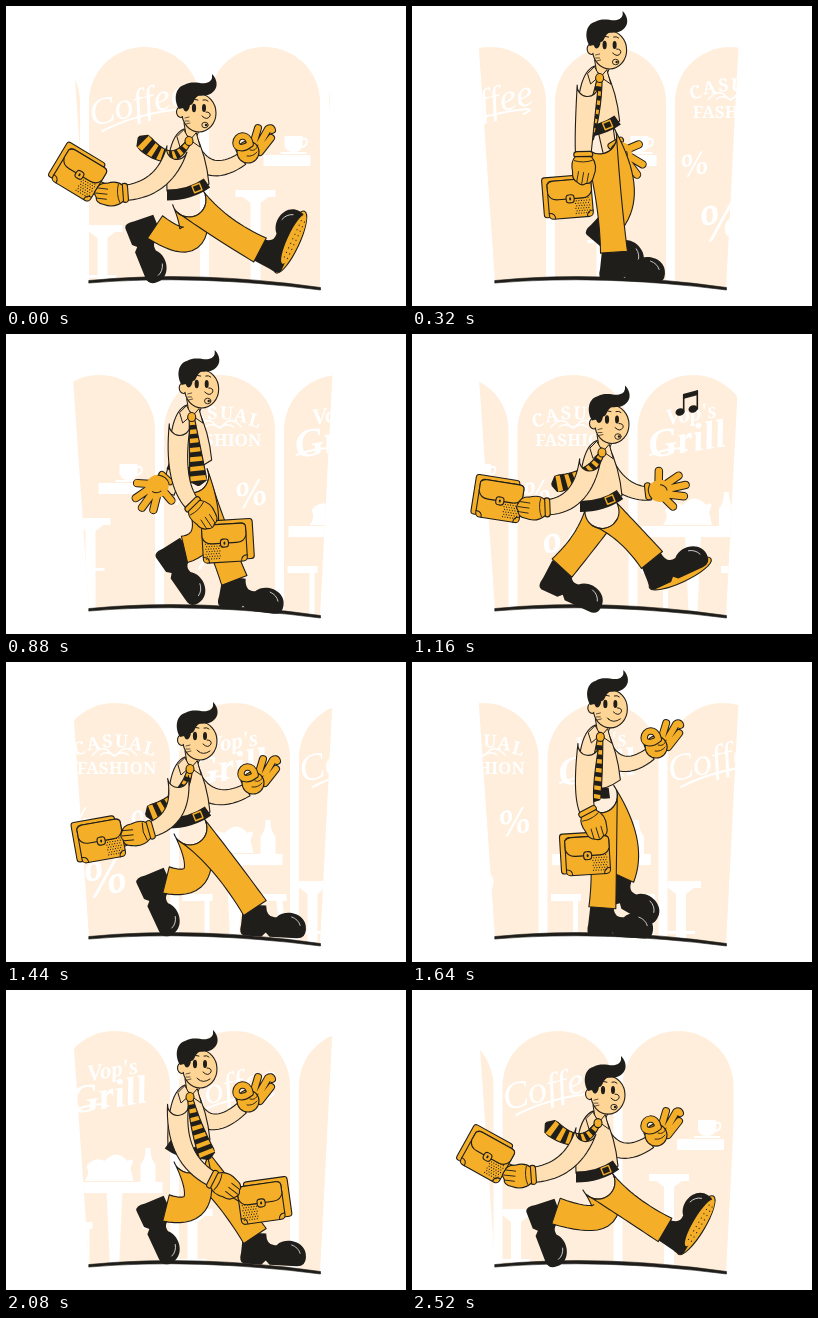
An HTML page with a canvas that plays this animation: 400 by 300 pixels, repeating every 2.56 s.

```html
<!DOCTYPE html>
<html lang="en">
<head>
<meta charset="utf-8">
<title>Stroll past the shops</title>
<style>
html, body { margin: 0; width: 100%; height: 100%; overflow: hidden; background: #fff; }
canvas { display: block; width: 400px; height: 300px; }
</style>
</head>
<body>
<canvas id="stage" width="400" height="300"></canvas>
<script>
const g = document.getElementById('stage').getContext('2d');
const INK = '#1f1e1a', ORANGE = '#f5ae28', SKIN = '#ffd596', SHIRT = '#ffe0b5', PEACH = '#ffeedb';
const LOOP = 2560, WALK = 1280, STEP = 40, TAU = Math.PI * 2;

// Periodic smooth interpolation; rows are [time, ...values].
function tween(rows, period, time) {
  const n = rows.length, t = ((time % period) + period) % period;
  let i = n - 1;
  while (i > 0 && rows[i][0] > t) i--;
  const at = k => {
    const m = ((k % n) + n) % n;
    return { r: rows[m], t: rows[m][0] + Math.floor(k / n) * period };
  };
  const [a, b, c, d] = [at(i - 1), at(i), at(i + 1), at(i + 2)];
  const h = c.t - b.t, s = (t - b.t) / h, s2 = s * s, s3 = s2 * s;
  return b.r.slice(1).map((v, j) => {
    const k = j + 1;
    const m0 = (c.r[k] - a.r[k]) / (c.t - a.t) * h;
    const m1 = (d.r[k] - v) / (d.t - b.t) * h;
    return (2 * s3 - 3 * s2 + 1) * v + (s3 - 2 * s2 + s) * m0 + (3 * s2 - 2 * s3) * c.r[k] + (s3 - s2) * m1;
  });
}

const SWAY = [[0, 0], [160, 1], [340, 5], [520, 7], [600, 3]];

// ankle x, ankle y, knee x, knee y, shoe angle
const LEG = [
  [0, 254, 244, 212, 222, -65], [160, 249, 246, 215, 195, 3], [340, 196, 246, 196, 195, 3],
  [440, 169, 243, 186, 200, 10], [520, 150, 234, 176, 206, 25], [600, 144, 221, 213, 244, 69],
  [640, 149, 221, 201, 256, 68], [800, 160, 218, 208, 230, 65], [980, 205, 214, 225, 182, 35],
  [1160, 240, 226, 215, 195, -25], [1240, 253, 240, 212, 216, -59]
];

// hand x, hand y, elbow x, elbow y, case x, case y, case angle
const CASE_ARM = [
  [0, 104, 188, 158, 184, 74, 168, 31], [160, 130, 172, 178, 158, 95, 178, -10],
  [380, 188, 163, 168, 138, 184, 192, -4], [600, 248, 177, 165, 197, 277, 155, -32],
  [800, 220, 196, 168, 170, 255, 212, -8], [980, 165, 160, 165, 132, 163, 191, 0],
  [1160, 120, 174, 170, 172, 88, 166, 9], [1240, 106, 186, 160, 182, 76, 166, 29]
];

// hand offset from the head
const FREE_ARM = [
  [0, 78, 69], [160, 76, 88], [380, 18, 155], [600, -64, 110], [800, -45, 122], [980, 12, 152],
  [1160, 74, 103], [1440, 82, 72], [1880, 66, 68], [2080, 77, 62], [2520, 77, 70]
];

// control x, y, tip x, y, offsets from the head
const TIE = [
  [0, -5, 98, -37, 62], [160, 7, 100, -31, 112], [380, 10, 100, 8, 130], [600, 14, 103, 50, 86],
  [800, 18, 96, 32, 128], [980, 12, 100, 2, 132], [1160, 1, 93, -37, 98], [1240, -4, 98, -39, 66]
];

function paint(fill, line = 1.1) {
  if (fill) { g.fillStyle = fill; g.fill(); }
  if (line) { g.strokeStyle = INK; g.lineWidth = line; g.stroke(); }
}
function shape(d, fill, line) {
  const p = new Path2D(d);
  if (fill) { g.fillStyle = fill; g.fill(p); }
  if (line) { g.strokeStyle = INK; g.lineWidth = line; g.stroke(p); }
}
function oval(x, y, rx, ry, fill, line = 0, rot = 0) {
  g.beginPath();
  g.ellipse(x, y, rx, ry, rot, 0, TAU);
  paint(fill, line);
}
function local(x, y, deg, draw, scale = 1) {
  g.save();
  g.translate(x, y);
  g.rotate(deg * Math.PI / 180);
  g.scale(scale, scale);
  draw();
  g.restore();
}
// Outlined stroke, for fingers and handles.
function rod(d, width, color = ORANGE) {
  const p = new Path2D(d);
  for (const [c, w] of [[INK, width + 2], [color, width]]) {
    g.strokeStyle = c;
    g.lineWidth = w;
    g.stroke(p);
  }
}

// Both edges of a curved limb whose width varies along its length.
function edges([x0, y0], [cx, cy], [x1, y1], width, from = 0, to = 1) {
  const left = [], right = [];
  for (let i = 0; i <= 18; i++) {
    const s = from + (to - from) * i / 18, r = 1 - s;
    const x = r * r * x0 + 2 * r * s * cx + s * s * x1;
    const y = r * r * y0 + 2 * r * s * cy + s * s * y1;
    const dx = r * (cx - x0) + s * (x1 - cx), dy = r * (cy - y0) + s * (y1 - cy);
    const k = width(s) / 2 / (Math.hypot(dx, dy) || 1);
    left.push([x - dy * k, y + dx * k]);
    right.push([x + dy * k, y - dx * k]);
  }
  return [left, right];
}
function limb(a, c, b, width, fill, line = 1.1, from = 0, to = 1) {
  const [l, r] = edges(a, c, b, width, from, to);
  g.beginPath();
  l.forEach(p => g.lineTo(...p));
  r.reverse().forEach(p => g.lineTo(...p));
  if (from === 0 && line) {
    const ang = Math.atan2(l[0][1] - a[1], l[0][0] - a[0]);
    g.arc(a[0], a[1], width(0) / 2, ang + Math.PI, ang + TAU);
  }
  g.closePath();
  paint(fill, line);
}

function word(text, x, y, size, style, deg = 0, family = '"Liberation Serif", serif') {
  local(x, y, deg, () => {
    g.font = `${style} ${size}px ${family}`;
    g.fillText(text, 0, 0);
  });
}
function stool(x, y) {
  g.fillRect(x - 20, y, 40, 7);
  shape(`M${x - 14} ${y + 6}H${x + 14}L${x + 5} ${y + 13}V290H${x - 5}V${y + 13}Z`, '#fff');
  g.fillRect(x - 14, y + 50, 28, 3);
}
function curve(d, width) {
  g.strokeStyle = '#fff';
  g.lineWidth = width;
  g.stroke(new Path2D(d));
}

const shops = [
  () => {
    word('Coffee', -4, 109, 38, 'italic', -13);
    curve('M-42 125Q-10 108 36 103Q44 103 33 108', 2);
    stool(-42, 219);
  },
  () => {
    g.fillRect(-1, 149, 47, 11);
    shape('M20 130H38V140Q36 146 29 146Q22 146 20 140Z', '#fff');
    curve('M38 133Q44 132 42 138Q40 141 37 141', 2);
    g.fillRect(16, 146, 26, 2);
    stool(-9, 184);
  },
  () => {
    const sign = 'bold', face = '"Noto Serif", serif';
    [...'CASUAL'].forEach((ch, i) => {
      const k = i - 2.5;
      word(ch, k * 13.5, 85 + k * k * 1.2, 18, sign, k * 6, face);
    });
    curve('M-22 93Q-12 82 -5 90Q0 96 5 90Q12 82 22 93M-14 93Q-8 88 0 94Q8 88 14 93', 1.6);
    word('FASHION', 2, 112, 17, sign, 0, face);
    word('%', -34, 169, 33, 'italic bold', -12);
    word('%', 34, 172, 38, 'italic bold', -12);
    word('%', -6, 232, 52, 'italic bold', -12);
  },
  () => {
    word("Vop's", -1, 87, 23, 'italic bold', -9);
    word('Grill', -4, 118, 40, 'italic bold', -9);
    curve('M-43 121Q-15 111 -6 116', 2);
    shape('M-30 191Q-24 184 -28 176Q-20 166 -10 171Q2 158 13 171Q22 166 16 178L19 191Z', '#fff');
    shape('M26 192V174Q31 170 31 158H36Q36 170 41 174V192Z', '#fff');
    g.fillRect(-51, 192, 99, 11);
    shape('M-8 200H8L4 290H-4ZM-52 232H-22V239H-25V290H-30V239H-52Z', '#fff');
    shape('M28 232H52V239H48L53 290H47L42 239H28Z', '#fff');
  }
];

function street(t) {
  const ground = new Path2D('M66 30H327L314 283Q190 265 83 276Z');
  g.save();
  g.clip(ground);
  for (let i = -1; i < 8; i++) {
    const x = 138.5 + i * 120 - t / LOOP * 480;
    if (x < 0 || x > 400) continue;
    g.save();
    g.translate(x, 0);
    const arch = new Path2D('M-55.5 300V96A55.5 55 0 0 1 55.5 96V300Z');
    g.fillStyle = PEACH;
    g.fill(arch);
    g.clip(arch);
    g.fillStyle = '#fff';
    shops[(i + 4) % 4]();
    g.restore();
  }
  g.restore();
  shape('M83 274.5Q190 264 314.5 281.5V284Q190 268 83 277Z', INK, 0.6);
}

function shoe(x, y, deg, near) {
  local(x, y, deg, () => {
    if (near && deg < -12) oval(20, 24, 34, 9, ORANGE, 1.1);
    shape('M-12 -3H11Q12 10 22 8C32 -2 53 4 52 19Q52 28 43 28H16L12 24L8 28H-10Q-15 27 -13 17Z', INK);
    g.strokeStyle = '#fff';
    g.lineWidth = 0.7;
    g.stroke(new Path2D('M37 7Q44 9 46 15'));
    if (near && deg < -35) {
      oval(24, 26, 27, 6, ORANGE);
      for (let i = 0; i < 18; i++) oval(4 + (i % 9) * 5, 26 + (i > 8 ? 2.5 : -1), 0.6, 0.6, INK);
    }
  });
}
function leg(hip, phase, near) {
  const [x, y, kx, ky, deg] = tween(LEG, WALK, phase);
  shoe(x, y, deg, near);
  limb(hip, [kx, ky], [x, y], s => 34 - 26 * s + 19 * s * s, ORANGE);
}

function okHand() {
  rod('M-2 4L4 -16M2 6L14 -15Q17 -17 18 -14M6 8L17 -6', 6);
  oval(-6, 8, 11, 11, ORANGE, 1.1);
  rod('M-4 0C-6 -12 -18 -9 -18 -1C-18 5 -10 5 -4 0', 5.5);
  shape('M-4 6Q2 8 4 1M-7 12Q-1 13 3 8', null, 0.9);
}
function openHand() {
  rod('M-4 -4L-2 -19M2 -4L17 -12M4 0L23 -2M3 5L20 9M0 8L8 18', 6.5);
  oval(-3, 1, 12, 11, ORANGE);
  shape('M-13 -6Q-17 1 -12 8M-2 -5Q3 -4 4 1', null, 1);
}
function fist(deg) {
  local(0, 0, deg, () => {
    shape('M-13 -8Q-4 -15 7 -10Q15 -8 14 -2Q17 2 13 6Q10 12 2 11Q-8 13 -13 8Z', ORANGE, 1.1);
    shape('M4 -5L14 -3M3 0L14 2M2 5L12 7M-9 -9Q-6 0 -9 9', null, 0.9);
  });
}
function cuff(hand, elbow, size) {
  const ang = Math.atan2(hand[1] - elbow[1], hand[0] - elbow[0]) * 180 / Math.PI;
  local(...hand, ang, () => {
    g.beginPath();
    g.roundRect(-18, -size / 2, 6, size, 3);
    paint(ORANGE);
  });
  return ang;
}

function freeArm(t, ox, oy) {
  const [hx, hy] = tween(FREE_ARM, LOOP, t);
  const hand = [ox + hx, oy + hy], elbow = [ox + 5 + hx * 0.33, oy + 114 - hx * 0.08];
  const ok = t < 120 || t >= 1280;
  const wrist = ok ? [hand[0] - 12, hand[1] + 15] : [hand[0] - Math.sign(hx) * 12, hand[1] + 4];
  limb([ox + 12, oy + 70], elbow, wrist, s => 19 - 6 * s, SHIRT);
  const deg = cuff(hand, ok ? [hand[0] - 24, hand[1] + 22] : elbow, 17);
  local(...hand, ok ? 0 : deg, ok ? okHand : openHand);
}

function briefcase(x, y, deg, hand) {
  rod(`M${x} ${y}L${hand[0]} ${hand[1] - 6}M${x + 4} ${y + 13}L${hand[0]} ${hand[1] + 5}`, 3);
  const front = hand[0] < x;
  local(x, y, deg, () => {
    const side = front ? 7 : -5;
    g.beginPath();
    g.roundRect(-22 + side, -22, 44, 40, 3);
    paint(ORANGE);
    g.beginPath();
    g.roundRect(-22, -18, 44, 38, 4);
    paint(ORANGE);
    const dots = front ? -19 : 5;
    for (let i = 0; i < 42; i++) {
      oval(dots + (i % 6) * 2.6 + (i / 6 & 1), 1 + Math.floor(i / 6) * 2.5, 0.6, 0.6, INK);
    }
    shape('M-22 -15Q-20 -18 -16 -18H17Q22 -18 22 -14V-6Q20 1 12 1H-12Q-20 1 -22 -6Z', ORANGE, 1.1);
    shape('M-22 14Q-16 14 -16 20M22 14Q16 14 16 20', null, 1);
    g.beginPath();
    g.roundRect(-4, -3, 8, 8, 3);
    paint(ORANGE);
    oval(0, 1, 1, 1.6, INK);
  });
}
function caseArm(t, ox, oy) {
  const [hx, hy, ex, ey, cx, cy, deg] = tween(CASE_ARM, WALK, t);
  const hand = [hx, hy], elbow = [ex, ey];
  const len = Math.hypot(hx - ex, hy - ey) || 1;
  const wrist = [hx - (hx - ex) / len * 13, hy - (hy - ey) / len * 13];
  briefcase(cx, cy, deg, hand);
  limb([ox + 1, oy + 74], elbow, wrist, s => 21 - 6 * s, SHIRT);
  const ang = cuff(hand, elbow, 19);
  local(...hand, 0, () => fist(ang));
}

function torso(t) {
  const front = Math.cos(t / WALK * TAU) > -0.1;
  shape('M8 54C-8 60 -10 95 -9 116Q12 124 33 109C31 88 25 70 19 58Z', SHIRT, 1.1);
  g.strokeStyle = INK;
  g.lineWidth = 11;
  g.lineCap = 'butt';
  g.stroke(new Path2D(front ? 'M-9 120Q14 120 31 108' : 'M-9 113Q6 124 22 122'));
  g.lineCap = 'round';
  if (front) local(21, 113, -22, () => {
    g.strokeStyle = ORANGE;
    g.lineWidth = 1.4;
    g.strokeRect(-4, -3.5, 8, 7);
  });
}
function tie(t, ox, oy) {
  const [cx, cy, ex, ey] = tween(TIE, WALK, t);
  const a = [ox + 13, oy + 66], c = [ox + cx, oy + cy], b = [ox + ex, oy + ey];
  const width = s => s > 0.93 ? 17 * (1 - s) / 0.07 + 2 : 5 + 13 * s;
  limb(a, c, b, width, INK);
  for (let i = 0; i < 7; i++) limb(a, c, b, s => width(s) - 1.2, ORANGE, 0, 0.06 + i * 0.135, 0.125 + i * 0.135);
  oval(a[0], a[1], 4, 4.5, ORANGE, 1.1);
}
function head(t) {
  const shut = (t >= 540 && t < 680) || (t >= 1820 && t < 1960);
  const whistle = t < 1320 || t >= 2300;
  shape('M8 48L10 60L19 65L23 56Z', SKIN, 1);
  oval(5, 37, 4.5, 5.5, SKIN, 1.1);
  oval(23, 38, 17, 19, SKIN, 1.1);
  oval(6, 37, 3.5, 4, SKIN);
  shape('M3 34C-3 24 0 12 8 10C17 5 23 9 30 8Q37 7 36 -1C42 5 42 13 37 17C32 22 26 20 22 21C17 24 18 30 14 30C13 37 9 39 7 33Z', INK);
  if (shut) shape('M16 34Q19 31 22 34M27 34Q30 31 33 34', null, 1);
  else {
    oval(18, 33, 2.1, 4.2, INK);
    oval(28, 33, 2, 4, INK);
  }
  shape('M15 26Q18 23 22 25M27 25Q30 24 32 26', null, 1);
  shape('M26 41Q31 46 34 41Q35 37 30 37', SKIN, 1);
  shape('M9 43L13 42M9 46L13 46M10 49L14 48', null, 0.7);
  if (whistle) {
    oval(29, 50, 3.2, 2.8, SKIN, 0.9);
    oval(30, 50, 1.2, 1.3, INK);
  } else shape('M21 48Q26 53 33 48M20 47L22 49', null, 1);
  shape('M8 55L13 64L4 72L1 62ZM20 58L14 65L24 72Z', SHIRT, 1);
}

function note(x, y, pair) {
  local(x, y, 0, () => {
    oval(-5, 9, 4.6, 3.6, INK, 0, -0.3);
    g.strokeStyle = INK;
    g.lineWidth = 1.6;
    if (pair) {
      oval(8, 6, 4.6, 3.6, INK, 0, -0.3);
      shape('M-2 -9L13 -13V-8L-2 -4Z', INK);
      g.stroke(new Path2D('M-1.3 9V-8M12.3 6V-12'));
    } else {
      g.stroke(new Path2D('M-1.3 9V-14'));
      shape('M-2 -16C2 -7 11 -8 16 -1C10 -4 3 -2 -2 -5Z', INK);
    }
  });
}
function music(t, ox, oy) {
  const one = (t - 480) / 400, two = (t - 1000) / 320;
  if (one > 0 && one < 1) {
    const x = 226 + 85 * one, y = 88 - 77 * one;
    if (one < 0.55) shape(`M${ox + 44} ${oy + 41}C${x - 20} ${oy + 38} ${x - 6} ${y + 34} ${x - 5} ${y + 15}`, null, 1);
    note(x, y, false);
  }
  if (two > 0 && two < 1) note(248 + 50 * two, 92 - 46 * two, true);
}

function draw(t) {
  g.clearRect(0, 0, 400, 300);
  g.lineJoin = g.lineCap = 'round';
  g.textAlign = 'center';
  const bob = t / 640 * TAU;
  const ox = 170 + tween(SWAY, 640, t)[0];
  const oy = 39.25 + 31.5 * Math.cos(bob) - 1.75 * Math.cos(2 * bob);
  const hip = [ox + 13, oy + 125];
  street(t);
  freeArm(t, ox, oy);
  leg(hip, t + 640, false);
  leg(hip, t, true);
  local(ox, oy, 0, () => { torso(t); head(t); });
  tie(t, ox, oy);
  caseArm(t, ox, oy);
  music(t, ox, oy);
}

const start = performance.now();
function tick() {
  const t = (performance.now() - start) % LOOP;
  draw(Math.floor(t / STEP) * STEP);
  requestAnimationFrame(tick);
}
tick();
</script>
</body>
</html>
```
